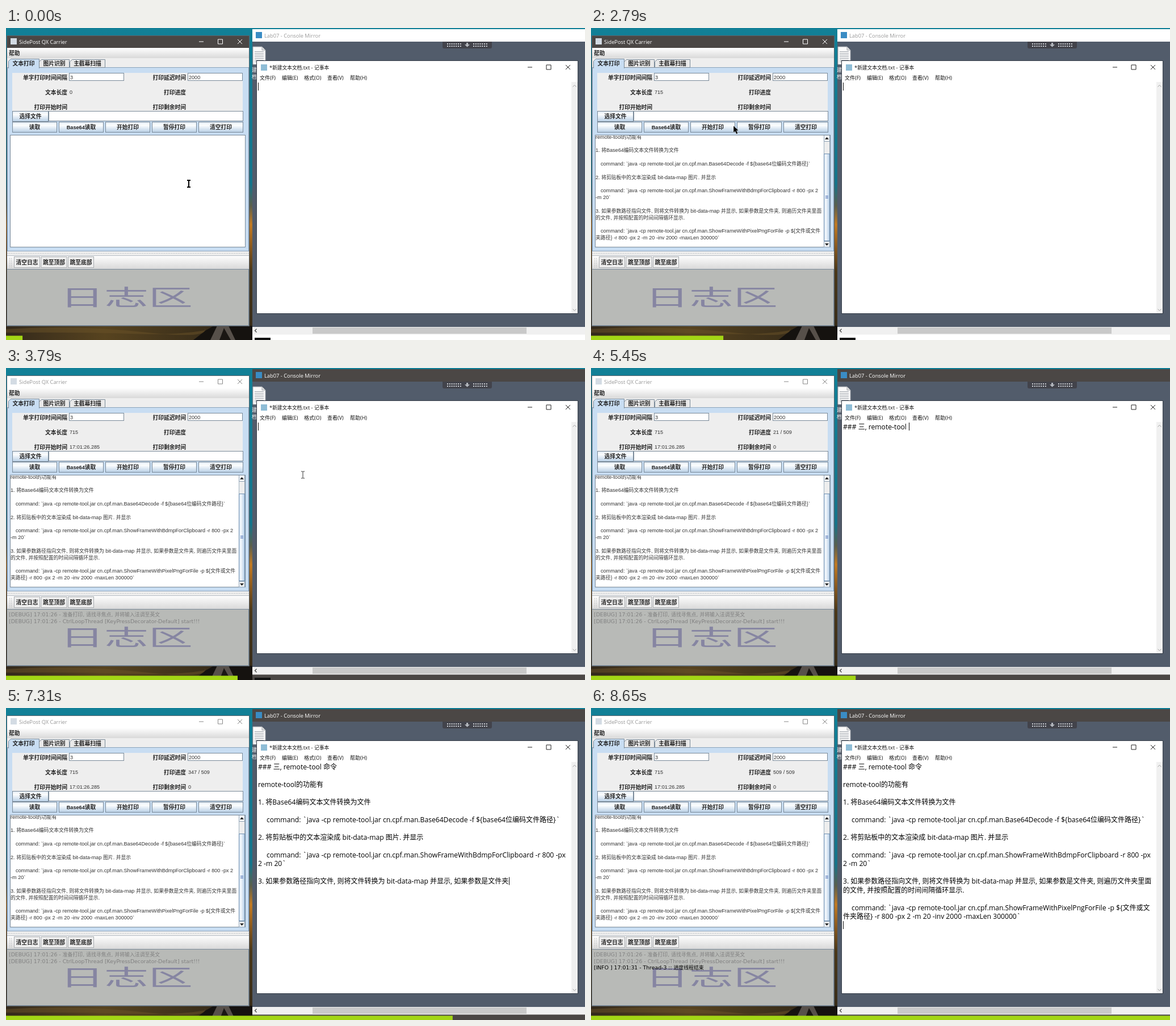
These frames come from a looping animation (1020x549 px, 9260 ms). An HTML page:

```html
<!DOCTYPE html>
<html lang="zh-CN">
<head>
<meta charset="utf-8">
<title>Text relay</title>
<style>
html, body { margin: 0; width: 100%; height: 100%; overflow: hidden; background: #3c321f; }
svg { display: block; width: 1020px; height: 549px; }
text { white-space: pre; }
</style>
</head>
<body>
<svg id="stage" viewBox="0 0 1020 549" xmlns="http://www.w3.org/2000/svg"></svg>
<script>
const LOOP = 9260;
const CJK = "'Noto Sans CJK SC','Noto Sans CJK'";
const face = (latin, s, c, w = 400) => ({ fam: `'${latin}',${CJK},sans-serif`, s, c, w });
const F = {
  label: face('Liberation Sans', 9.2, 9.75, 700),
  value: face('Liberation Sans', 9.1, 9),
  area: face('Liberation Sans', 9.1, 8.8),
  log: face('DejaVu Sans', 9.3, 8.9),
  title: face('Open Sans', 9.3, 8.7),
  menu: face('Open Sans', 9, 9),
  note: face('Open Sans', 12.13, 12),
  keys: face('Open Sans', 19, 19, 700)
};

// Han and Latin runs carry their own sizes
const runs = (s, f) => s.split(/([\u4e00-\u9fff]+)/).filter(Boolean).map(r =>
  `<tspan font-size="${/[\u4e00-\u9fff]/.test(r) ? f.c : f.s}">${r}</tspan>`).join('');
const text = (x, y, s, f, fill = '#333', anchor = 'start', more = '') =>
  `<text x="${x}" y="${y}" font-family="${f.fam}" font-weight="${f.w}" fill="${fill}" text-anchor="${anchor}" ${more}>${runs(s, f)}</text>`;
const rect = (x, y, w, h, fill, stroke, more = '') => stroke
  ? `<rect x="${x + .5}" y="${y + .5}" width="${w - 1}" height="${h - 1}" fill="${fill}" stroke="${stroke}" ${more}/>`
  : `<rect x="${x}" y="${y}" width="${w}" height="${h}" fill="${fill}" ${more}/>`;
const path = (d, fill, stroke = 'none', more = '') =>
  `<path d="${d}" fill="${fill}" stroke="${stroke}" ${more}/>`;
const grad = (id, stops, across) =>
  `<linearGradient id="${id}" x2="${across ? 1 : 0}" y2="${across ? 0 : 1}">` +
  stops.map(([o, c]) => `<stop offset="${o}" stop-color="${c}"/>`).join('') + '</linearGradient>';
const group = (id, body, more = '') => `<g id="${id}" ${more}>${body}</g>`;
const controls = (x, y, step, color) => path(
  `M${x} ${y}h8M${x + step - .5} ${y - 4}h8v8h-8zM${x + 2 * step} ${y - 4}l8 8m0 -8l-8 8`, 'none', color);

// "|" wraps in the left pane, "~" wraps in the notepad
const cmd = s => '    command: `java -cp remote-tool.jar cn.cpf.man.' + s + '`';
const paras = [
  '### 三, remote-tool 命令', 'remote-tool的功能有', '1. 将Base64编码文本文件转换为文件',
  cmd('Base64Decode -f ${base64位编码文件路径}'),
  '2. 将剪贴板中的文本渲染成 bit-data-map 图片. 并显示',
  cmd('ShowFrameWithBdmpForClipboard -r 800 -px ~2 |-m 20'),
  '3. 如果参数路径指向文件, 则将文件转换为 bit-data-map 并显示, 如果参数是文件夹, 则遍历文件夹里面|~的文件, 并按照配置的时间间隔循环显示.',
  cmd('ShowFrameWithPixelPngForFile -p ${文件或文~件|夹路径} -r 800 -px 2 -m 20 -inv 2000 -maxLen 300000')
];
const wrap = (mark, other) => paras.join('\n\n').replaceAll(other, '').replaceAll(mark, '\n').split('\n');
const areaRows = wrap('|', '~');
const noteRows = [...wrap('~', '|'), ''];
const all = noteRows.join('\n');
const endOf = s => all.indexOf(s) + s.length;
const typedMarks = [[0, 0], [198, endOf('并显示')], [347, endOf('如果参数是文件夹')], [509, all.length]];

const line = (s, x, y, indent, f, fill) => {
  const lead = s.startsWith('    ') ? 4 : 0;
  return text(x + (lead ? indent : 0), y, s.slice(lead), f, fill);
};

function backdrop() {
  return rect(0, 0, 1020, 549, 'url(#wall)') +
    rect(0, 524, 434, 25, 'url(#soil)') +
    path('M330 549L352 532L366 524H434V549Z', '#15120f') +
    path('M360 549L372 524H392L404 549Z', '#57504a') +
    path('M376 549L384 528L396 549Z', '#1a1613') +
    path('M0 530Q120 522 240 535T350 528V532Q300 541 220 538T0 536Z', '#6a5328', 'none', 'opacity=".5"');
}

function relayWindow() {
  const label = (x, y, s) => text(x, y, s, F.label, '#222', 'end');
  const button = (x, y, w, h, s) => rect(x, y, w, h, 'url(#metal)', '#7a8a99') +
    text(x + w / 2, y + h / 2 + 3.7, s, F.label, '#222', 'middle');
  const field = (x, y, w, h) => rect(x, y, w, h, '#fff', '#7a8a99');
  let s = rect(1, 13, 428, 512, '#eee') + '<g id="relayBar"></g>' +
    rect(1, 35, 428, 18, 'url(#bar)') + text(5, 47.5, '帮助', F.label, '#222') +
    rect(2, 53, 426, 17, '#eee') +
    rect(2, 69, 426, 324, '#c8ddf2', '#8ba3bb');
  [[58, 54, '图片识别'], [112, 63, '主截幕扫描']].forEach(([x, w, t]) => {
    s += path(`M${x + .5} 69.5V59.5L${x + 4.5} 55.5H${x + w - .5}V69.5Z`, '#e9e9e9', '#7a8a99') +
      text(x + w / 2, 66, t, F.label, '#222', 'middle');
  });
  s += path('M4.5 71V58.5L8.5 54.5H58.5V71', '#c8ddf2', '#7a8a99') + text(31, 66, '文本打印', F.label, '#222', 'middle') +
    rect(11, 79, 406, 67, '#eee');
  [['单字打印时间间隔', '打印延迟时间', 90.5], ['文本长度', '打印进度', 116.8], ['打印开始时间', '打印剩余时间', 142.8]]
    .forEach(([a, b, y]) => s += label(108, y, a) + label(317, y, b));
  s += field(111, 79, 97, 14) + field(320, 79, 97, 14) +
    text(113, 90, '3', F.value) + text(322, 90, '2000', F.value) +
    '<g id="values"></g>' + field(75, 146, 343, 18) + button(11, 146, 64, 19, '选择文件');
  ['读取', 'Base64读取', '开始打印', '暂停打印', '清空打印'].forEach((t, i) => s += button(11 + 82 * i, 165, 79, 19, t));
  s += rect(7, 188, 415, 198, '#fff', '#7a8a99');

  let pane = areaRows.map((r, i) => line(r, 8, 170.8 + 11.85 * i, 9, F.area)).join('') +
    rect(410, 188, 11, 198, '#eee', '#9fb0c0') + rect(410, 188, 11, 12, '#f3f6f9', '#8fa2b5') +
    rect(410, 375, 11, 11, '#f3f6f9', '#8fa2b5') +
    path('M412 196h7l-3.5 -4zM412 379h7l-3.5 4z', '#222') +
    rect(410, 221, 11, 154, 'url(#thumb)', '#6f8fb0') +
    path('M413 295.5h5M413 297.5h5M413 299.5h5', 'none', '#6382bf');
  s += group('pane', pane, 'clip-path="url(#paneClip)"') + rect(8, 374, 1, 11, '#111', '', 'id="areaCaret"');

  s += rect(1, 393, 428, 7, '#eee') + rect(2, 394, 426, 5, 'url(#dots)') +
    rect(1, 400, 428, 24, 'url(#bar)') + rect(4, 403, 8, 18, 'url(#dots)') +
    path('M1 400.5H429', 'none', '#b5bcc4');
  ['清空日志', '跳至顶部', '跳至底部'].forEach((t, i) => {
    const x = 14 + 47.5 * i;
    s += rect(x, 402, 46, 20, '#eee', '#a9adb1') + text(x + 23, 415.8, t, F.label, '#222', 'middle');
  });
  s += rect(1, 424, 427, 100, '#b8bab7', '#7a8a99') +
    `<text transform="translate(95 488) scale(2 1)" font-family="${CJK},sans-serif" font-size="39" font-weight="500" fill="#8685a2">日志区</text>` +
    '<g id="log"></g>' + rect(1, 13, 428, 512, 'none', '#59636c');
  return s;
}

function viewerWindow() {
  let s = rect(434, 3, 586, 546, '#525c6b') + '<g id="viewerBar"></g>' +
    path('M769 24H856V33Q856 36 853 36H772Q769 36 769 33Z', '#42434b');
  [777, 823].forEach(x => {
    for (let i = 0; i < 14; i++) s += rect(x + (i % 7) * 3.8, i < 7 ? 27 : 31, 2, 2, '#d0d3d8');
  });
  s += path('M811 26h3v3h3l-4.500 4.500l-4.500 -4.500h3z', '#b4b8be') +
    path('M435 33H451L457 39V64H435Z', '#fafafa', '#a9adb3') + path('M451 33V39H457', '#ddd', '#a9adb3');
  for (let i = 0; i < 7; i++) s += rect(438, 41 + 3 * i, 16, 1, '#9da3aa');
  s += text(433, 76.5, '建', F.menu, '#fff') + text(433, 89, '档', F.menu, '#fff');

  s += rect(441, 57, 567, 446, '#fff', '#343c47') +
    rect(449, 64, 11, 11, '#8fbdd6') + text(464, 72.5, '*新建文本文档.txt - 记事本', F.title, '#111') +
    controls(919, 69, 33.5, '#222');
  [[447, '文件(F)'], [486, '编辑(E)'], [525, '格式(O)'], [566, '查看(V)'], [606, '帮助(H)']]
    .forEach(([x, t]) => s += text(x, 91, t, F.menu, '#111'));
  s += rect(996, 95, 11, 407, '#f0f0f0') +
    path('M998.500 103.500l3 -3l3 3M998.500 494.500l3 3l3 -3', 'none', '#a0a0a0') +
    '<g id="note"></g>' + rect(444, 96, 1, 14, '#111', '', 'id="noteCaret"');
  s += rect(434, 526, 586, 14, '#f0f0f0') + rect(540, 527, 377, 11, '#c9c9c9') +
    path('M441.500 529.500l-3 3l3 3', 'none', '#444', 'stroke-width="1.300"') +
    '<g id="viewerFoot"></g>' + rect(438, 545, 28, 28, '#111');
  return s;
}

const stage = document.getElementById('stage');
stage.innerHTML = '<defs>' +
  grad('wall', [[0, '#128097'], [.5, '#16748a'], [.57, '#5b5f4c'], [.63, '#c07a25'], [.7, '#8a5a20'], [.78, '#493719'], [1, '#33291a']]) +
  grad('soil', [[0, '#33291b'], [.4, '#57431f'], [.8, '#3a2e1a'], [1, '#2a221a']], true) +
  grad('bar', [[0, '#fff'], [1, '#d9d9d9']]) +
  grad('metal', [[0, '#dfe9f3'], [.3, '#fdfefe'], [.5, '#eaf1f8'], [1, '#b8cfe5']]) +
  grad('thumb', [[0, '#cfdfef'], [.35, '#f4f8fc'], [1, '#b0cbe6']], true) +
  '<pattern id="dots" width="3" height="3" patternUnits="userSpaceOnUse"><path d="M0 0h1v1h-1z" fill="#a4a8ac"/></pattern>' +
  '<clipPath id="paneClip"><rect x="7" y="189" width="415" height="197"/></clipPath></defs>' +
  backdrop() + relayWindow() + viewerWindow() +
  rect(0, 541.5, 0, 7.500, '#a3d615', '', 'id="progress"') +
  group('keys', '') + group('cursor', '');
const el = Object.fromEntries([...stage.querySelectorAll('[id]')].map(n => [n.id, n]));

const seq = (a, b, n) => Array.from({ length: n }, (_, i) => a + (b - a) * i / (n - 1));
const steps = [0, 890, 1500, ...seq(2110, 3130, 7), ...seq(3290, 3790, 4),
  ...seq(5280, 6290, 7), ...seq(6460, 7480, 7), ...seq(7640, 8650, 7)];

const track = (keys, v) => {
  let i = 1;
  while (i < keys.length - 1 && v > keys[i][0]) i++;
  const a = keys[i - 1], b = keys[i];
  const k = Math.min(1, Math.max(0, (v - a[0]) / (b[0] - a[0])));
  return a.slice(1).map((p, j) => p + (b[j + 1] - p) * k);
};
const mousePath = [[2110, 322, 274], [2790, 251, 172], [3130, 245, 174], [3620, 515, 187], [3790, 523, 188]];

function cursorShape(t) {
  const [x, y] = track(mousePath, t);
  const beam = `M${x - 3} ${y - 6}h2.500l.5 .5l.5 -.5h2.500M${x} ${y - 5.500}v11M${x - 3} ${y + 6}h2.500l.5 -.5l.5 .5h2.500`;
  if (x > 442) return path(beam, 'none', '#333', 'stroke-width="1"');
  if (y > 188 && x < 421) return path(beam, 'none', '#000', 'stroke-width="2"');
  return path(`M${x} ${y}v12l2.800 -2.500l2.200 5l2.500 -1.100l-2.200 -4.800h3.700z`, '#000', '#fff', 'stroke-width=".4"');
}

function bars(viewerOn) {
  const dark = '#4b4745';
  el.relayBar.innerHTML = rect(1, 13, 428, 22, viewerOn ? '#fff' : dark) +
    rect(8, 18, 11, 11, '#d3dbe3') +
    text(23, 27.5, 'SidePost QX Carrier', F.title, viewerOn ? '#999' : '#fff') +
    controls(340, 24, 34, viewerOn ? '#888' : '#fff');
  el.viewerBar.innerHTML = rect(434, 2, 586, 22, viewerOn ? dark : '#fff') +
    rect(440, 7, 11, 11, '#3a8cc4') +
    text(455, 16.500, 'Lab07 - Console Mirror', F.title, viewerOn ? '#fff' : '#999');
  el.viewerFoot.innerHTML = rect(434, 539.5, 586, 9.500, viewerOn ? dark : '#fff');
}

function typeNote(count, caretOn) {
  let left = Math.round(track(typedMarks, count)[0]);
  let out = '', row = 0;
  for (; row < noteRows.length; row++) {
    out += line(noteRows[row].slice(0, left), 444, 107.700 + 15.5 * row, 15, F.note, '#000');
    if (left <= noteRows[row].length) break;
    left -= noteRows[row].length + 1;
  }
  el.note.innerHTML = out;
  const last = el.note.lastElementChild;
  const end = left ? +last.getAttribute('x') + last.getComputedTextLength() + 1 : 444;
  el.noteCaret.setAttribute('x', Math.round(end));
  el.noteCaret.setAttribute('y', 96 + 15.5 * Math.min(row, noteRows.length - 1));
  show(el.noteCaret, caretOn);
}

const show = (node, on) => node.setAttribute('visibility', on ? 'visible' : 'hidden');

function draw(i) {
  const t = steps[i], pasted = t >= 1500, started = t > 3100, typing = t >= 5280;
  const count = typing ? Math.min(509, Math.max(1, Math.round(198 + (t - 6460) * .1753))) : 0;
  bars(t > 3600);
  show(el.pane, pasted);
  show(el.areaCaret, t === 1500);
  el.values.innerHTML = text(112, 116, pasted ? '715' : '0', F.value) +
    (started ? text(112, 142, '17:01:26.285', F.value) : '') +
    (typing ? text(321, 116, count + ' / 509', F.value) + text(321, 142, '0', F.value) : '');
  el.log.innerHTML = (started
    ? text(5, 437, '[DEBUG] 17:01:26 - 准备打印, 请找寻焦点, 并将输入法调至英文', F.log, '#808080') +
      text(5, 448.500, '[DEBUG] 17:01:26 - CtrlLoopThread [KeyPressDecorator-Default] start!!!', F.log, '#808080') : '') +
    (count === 509 ? text(5, 460.300, '[INFO ] 17:01:31 - Thread-3 :: 进度线程结束', F.log, '#000') : '');
  typeNote(count, t !== 6460);
  el.progress.setAttribute('width', 1020 * (i + 1) / steps.length);
  el.keys.innerHTML = t === 890 || t === 1500
    ? rect(465, 517, pasted ? 91 : 70, 32, '#000') + text(471, 540, pasted ? 'Ctrl + V' : 'Ctrl +', F.keys, '#fff') : '';
  el.cursor.innerHTML = typing ? '' : cursorShape(t);
}

const begin = performance.now();
let shown = -1;
function tick() {
  const t = (performance.now() - begin) % LOOP;
  const i = steps.findLastIndex(s => s <= t + 1);
  if (i !== shown) draw(shown = i);
  requestAnimationFrame(tick);
}
tick();
</script>
</body>
</html>
```
